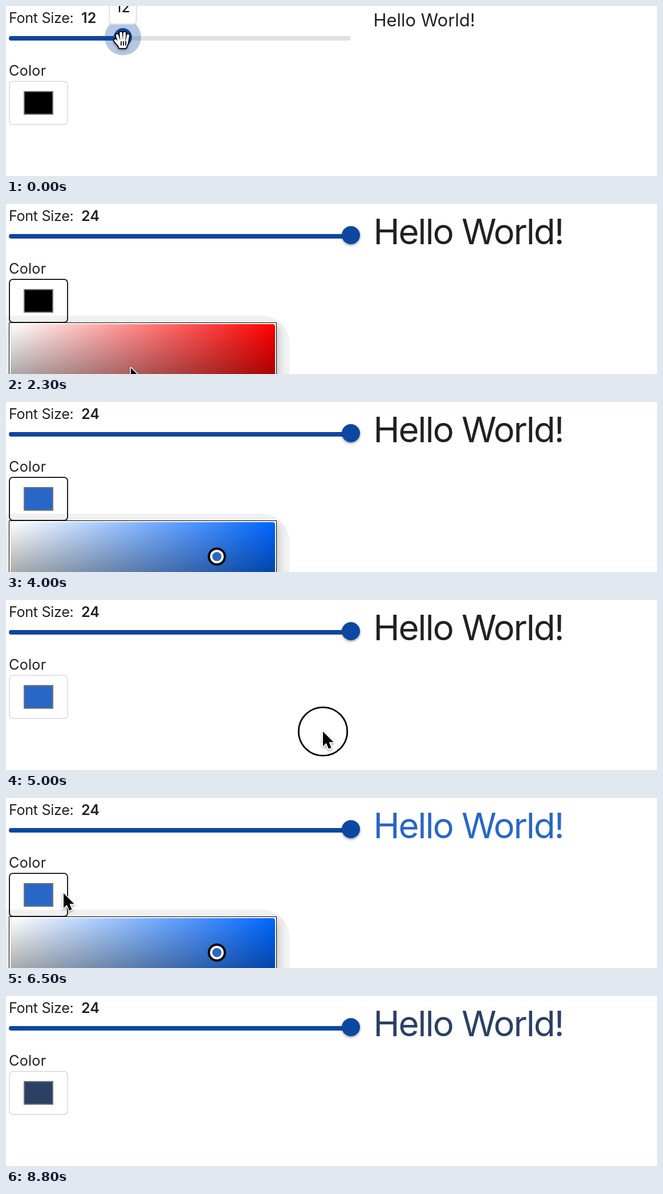
These frames come from a looping animation (1142 by 300 pixels, 8900 ms). An HTML page:

```html
<!DOCTYPE html>
<html lang="en">
<head>
<meta charset="utf-8">
<title>Font size and color</title>
<style>
  html, body { margin: 0; width: 100%; height: 100%; overflow: hidden; background: #fff; }
  svg { display: block; width: 1142px; height: 300px; font: 440 25.2px Inter, "Open Sans", sans-serif; fill: #212121; }
  .bold { font-weight: 600; }
</style>
</head>
<body>
<svg viewBox="0 0 1142 300">
  <defs>
    <linearGradient id="white">
      <stop stop-color="#fff"/><stop offset="1" stop-color="#fff" stop-opacity="0"/>
    </linearGradient>
    <linearGradient id="black" x2="0" y2="1">
      <stop stop-opacity="0"/><stop offset="1"/>
    </linearGradient>
    <filter id="drop" x="-50%" y="-50%" width="200%" height="200%">
      <feDropShadow dx="0" dy="2" stdDeviation="2" flood-opacity=".4"/>
    </filter>
    <filter id="blur" x="-20%" y="-20%" width="140%" height="140%">
      <feGaussianBlur stdDeviation="7"/>
    </filter>
    <path id="fingers" d="M-12 1L-5 9M-9-8L-5 4M-2.500-12L-1 4M4-12L3 4M10-8L8 4M-5 4H8L5 12H-4Z"/>
  </defs>

  <rect id="strip" x="368" y="298" width="405" height="2" fill="#f8f8f8"/>

  <text x="5" y="30" letter-spacing="-.35">Font Size:</text>
  <text id="size" class="bold" x="132" y="30"></text>
  <text x="5" y="123" letter-spacing=".25">Color</text>
  <text id="hello" x="644.400">Hello World!</text>

  <rect x="5" y="53" width="600" height="8" rx="4" fill="#e0e0e0"/>
  <rect id="track" x="5" y="53" height="8" rx="4" fill="#0d47a1"/>
  <g id="thumb">
    <circle id="halo" r="32" fill="#0d47a1" fill-opacity=".3"/>
    <circle id="knob" r="16" fill="#0d47a1"/>
    <g id="tip">
      <rect id="bubble" y="-85" height="62" rx="6" fill="#fff" stroke="#e0e0e0" stroke-width="2"/>
      <text id="tipText" y="-44" text-anchor="middle" fill="#000"></text>
    </g>
  </g>

  <rect id="button" x="6" y="133" width="102" height="76" rx="6" fill="#fff" stroke-width="2"/>
  <rect id="swatch" x="32" y="151" width="50" height="40" stroke="#767676" stroke-width="2"/>

  <g id="picker">
    <rect x="-40" y="197" width="537" height="200" rx="48" opacity=".055" fill="#000"/>
    <rect x="8" y="216" width="472" height="130" fill="#000" opacity=".15" filter="url(#blur)"/>
    <rect x="5.5" y="209.500" width="469" height="300" fill="#fff" stroke="#000"/>
    <rect id="hue" x="8" y="212" width="464" height="270" rx="4"/>
    <rect x="8" y="212" width="464" height="270" rx="4" fill="url(#white)"/>
    <rect x="8" y="212" width="464" height="270" rx="4" fill="url(#black)"/>
    <g id="marker">
      <circle r="16" fill="#000"/><circle r="12" fill="#fff"/><circle id="dot" r="8"/>
    </g>
  </g>

  <g id="ring" fill="none">
    <circle r="42.700" stroke="#fff" stroke-width="5"/>
    <circle r="42.700" stroke="#000" stroke-width="2.800"/>
  </g>
  <g id="arrow" filter="url(#drop)">
    <path d="M0 0V26L5.800 20.400L10 30.500L14.500 28.500L10.500 18.800H18.500Z"
      stroke="#fff" stroke-width="3" stroke-linejoin="round" paint-order="stroke" fill="#000"/>
  </g>
  <g id="hand" filter="url(#drop)" fill="#fff" stroke-linejoin="round" stroke-linecap="round">
    <use href="#fingers" stroke="#000" stroke-width="8"/>
    <use href="#fingers" stroke="#fff" stroke-width="4.500"/>
    <path d="M-2 3V9M2 3V9M6 3V9" stroke="#000" stroke-width="1.800"/>
  </g>
</svg>
<script>
const LOOP = 8900, STEP = 100, HOLD = 200;
const $ = Object.fromEntries([...document.querySelectorAll('[id]')].map(e => [e.id, e]));

const drag = { from: 100, to: 700 };
const click = { open: 1700, pick: 3000, close: 4900, reopen: 6000, end: 7800 };
const turn = { from: 3500, to: 3800 };
const shade = { from: 6800, to: 7100 };

// Where the pointer is from one time until another; it glides between stops.
const stop = (x, y, from, until = from) => ({ x, y, from, until });
const stops = [
  stop(204, 60, 0, drag.from),
  stop(605, 60, drag.to, drag.to + HOLD / 2),
  stop(219, 135, 1300),
  stop(60, 163, click.open, click.open + HOLD),
  stop(219, 289, 2300),
  stop(369.5, 274.5, click.pick, click.pick + HOLD),
  stop(345, 350, turn.from),
  stop(440, 350, turn.to),
  stop(556, 232, click.close - 200, click.close + HOLD),
  stop(62, 166, click.reopen, click.reopen + HOLD),
  stop(101, 168, 6500),
  stop(272, 374, shade.to, shade.to + HOLD),
  stop(590, 240, click.end - 100, click.end + 2 * HOLD),
  stop(625, 340, LOOP - HOLD, LOOP)
];

const ramp = (t, { from, to }) => Math.min(1, Math.max(0, (t - from) / (to - from)));
const between = (t, a, b) => t >= a && t < b;
const show = (el, on) => el.setAttribute('display', on ? 'inline' : 'none');
const set = (el, attrs) => { for (const k in attrs) el.setAttribute(k, attrs[k]); };
const place = (el, x, y) => set(el, { transform: `translate(${x} ${y})` });

function pointer(t) {
  const a = stops.findLast(s => s.from <= t);
  const b = stops[stops.indexOf(a) + 1] || a;
  const k = t <= a.until ? 0 : ramp(t, { from: a.until, to: b.from });
  return [a.x + (b.x - a.x) * k, a.y + (b.y - a.y) * k];
}

function hsv(h, s, v) {
  const part = n => {
    const k = (n + h / 60) % 6;
    return Math.round(255 * v * (1 - s * Math.max(0, Math.min(k, 4 - k, 1))));
  };
  return `rgb(${part(5)},${part(3)},${part(1)})`;
}

// The swatch follows the picker at once; the greeting waits for it to close.
function choice(t) {
  const h = 216 * ramp(t, turn), k = ramp(t, shade);
  return t < click.pick ? { h, s: 0, v: 0 } : { h, s: 0.8 - 0.23 * k, v: 0.775 - 0.387 * k };
}

function ink(t) {
  if (t < click.close + HOLD) return '#212121';
  const { h, s, v } = choice(t < click.end + HOLD ? click.close : t);
  return hsv(h, s, v);
}

function drawSlider(t) {
  const grow = Math.round(12 * ramp(t, drag)) / 12;
  const size = 12 + 12 * grow;
  const x = 5 + (size - 6) / 18 * 600;
  const active = t < click.open;
  $.size.textContent = $.tipText.textContent = Math.round(size);
  set($.track, { width: x - 5 });
  place($.thumb, x, 55);
  show($.halo, active);
  show($.tip, active);
  set($.knob, { filter: active ? 'none' : 'url(#drop)' });
  const w = $.tipText.getComputedTextLength() + 22;
  set($.bubble, { x: -w / 2, width: w });
  set($.hello, {
    y: 35.5 * (1 + grow), fill: ink(t),
    'font-size': 31 * (1 + grow), 'letter-spacing': -2 * grow
  });
}

function drawPicker(t) {
  const { h, s, v } = choice(t);
  const open = between(t, click.open + HOLD, click.close) || between(t, click.reopen + STEP, click.end);
  set($.swatch, { fill: hsv(h, s, v) });
  set($.dot, { fill: hsv(h, s, v) });
  set($.hue, { fill: hsv(h, 1, 1) });
  place($.marker, 8 + 464 * s * 0.975, 212 + 270 * (1 - v));
  set($.button, { stroke: open ? '#212121' : '#e0e0e0' });
  show($.picker, open);
}

function drawPointer(t) {
  const [x, y] = pointer(t);
  const grab = t <= drag.to;
  const pressed = between(t, drag.from, drag.to) ||
    Object.values(click).some(c => between(t, c, c + HOLD));
  show($.hand, grab);
  show($.arrow, !grab);
  show($.ring, pressed);
  for (const el of [$.hand, $.arrow, $.ring]) place(el, x, y);
}

function render(t) {
  drawSlider(t);
  drawPicker(t);
  drawPointer(t);
  show($.strip, between(t, 1000, click.open + HOLD));
}

const start = performance.now();
function tick() {
  const t = (performance.now() - start) % LOOP;
  render(Math.floor(t / STEP) * STEP);
  requestAnimationFrame(tick);
}
tick();
</script>
</body>
</html>
```
